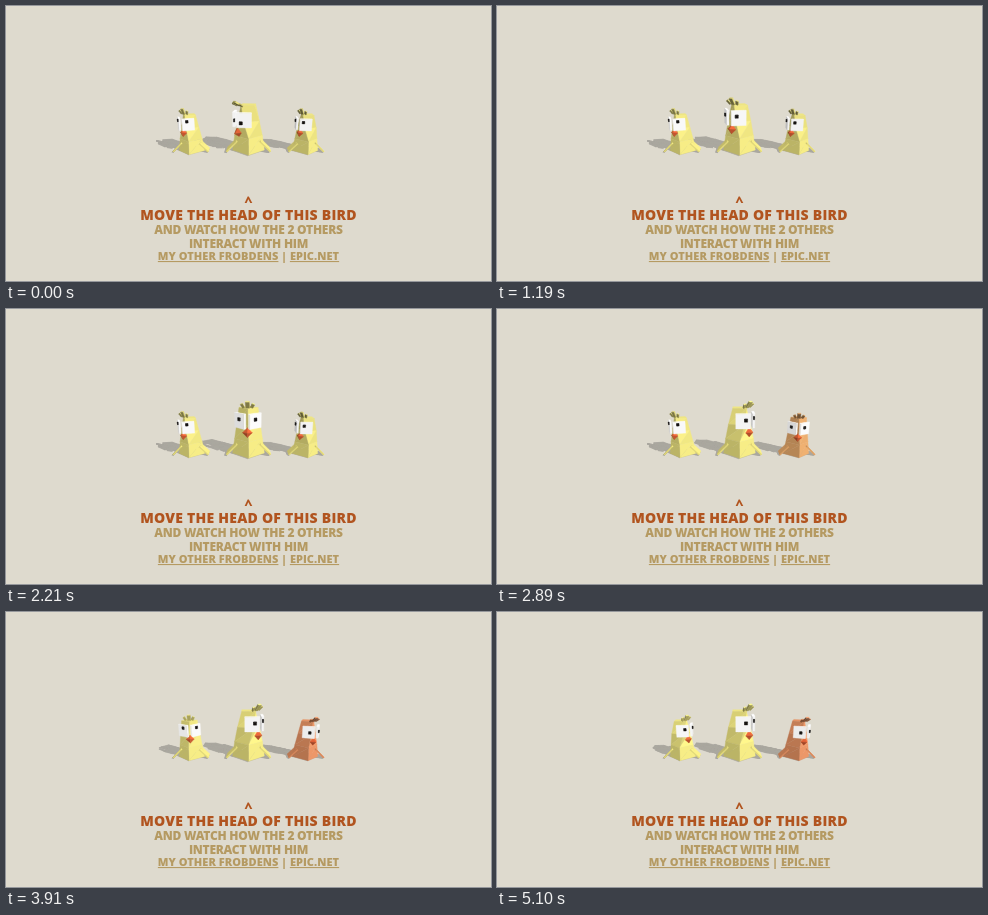
An HTML page for the animation above (5270 ms loop, 485 px wide and 275 px high).

```html
<!DOCTYPE html>
<html lang="en">
<head>
<meta charset="utf-8">
<title>Three birds</title>
<style>
  html, body { margin: 0; width: 100%; height: 100%; overflow: hidden; background: #dedace; }
  svg { display: block; width: 485px; height: 275px; }
  text { font-family: "Open Sans", sans-serif; font-weight: 800; text-anchor: middle; fill: #b59a62; }
  .title { font-size: 14px; letter-spacing: .24px; fill: #b1541f; }
  .sub { font-size: 12px; letter-spacing: -.25px; }
  .links { font-size: 11px; letter-spacing: .05px; }
  .links tspan { text-decoration: underline; }
</style>
</head>
<body>
<svg viewBox="0 0 485 275">
  <rect width="485" height="275" fill="#dedace"/>
  <g id="shadows" fill="#aaa89f" stroke="#aaa89f" stroke-width=".3"></g>
  <g id="birds" stroke-width=".35" stroke-linejoin="round"></g>
  <text class="title" x="242.5" y="200">^</text>
  <text class="title" x="242.5" y="214">MOVE THE HEAD OF THIS BIRD</text>
  <text class="sub" x="242.5" y="228">AND WATCH HOW THE 2 OTHERS</text>
  <text class="sub" x="242.5" y="242">INTERACT WITH HIM</text>
  <text class="links" x="242.5" y="254"><tspan>MY OTHER FROBDENS</tspan> | <tspan>EPIC.NET</tspan></text>
</svg>
<script>
const STEP = 170, STEPS = 31;
const FLOOR = -33;
const CAMERA = [0, 300, 1000];
const DISTANCE = Math.hypot(...CAMERA);
const FOCAL = 137.5 / Math.tan(Math.PI / 6);
const TILT_SIN = 300 / DISTANCE, TILT_COS = 1000 / DISTANCE;
const LIGHT = [1, 1, 1].map(v => v / Math.sqrt(3));
const SKIN = [248, 238, 135], SHY_SKIN = [238, 152, 104];
const WHITE = [255, 255, 255], BLACK = [22, 20, 18], ORANGE = [238, 104, 58];

const { sin, cos, PI } = Math;
const add = (a, b) => a.map((v, i) => v + b[i]);
const sub = (a, b) => a.map((v, i) => v - b[i]);
const dot = (a, b) => a[0] * b[0] + a[1] * b[1] + a[2] * b[2];
const cross = (a, b) => [
  a[1] * b[2] - a[2] * b[1], a[2] * b[0] - a[0] * b[2], a[0] * b[1] - a[1] * b[0]];
const mean = pts => pts.reduce(add).map(v => v / pts.length);
const mix = (a, b, k) => a + (b - a) * k;

const rotX = ([x, y, z], a) => [x, y * cos(a) - z * sin(a), y * sin(a) + z * cos(a)];
const rotY = ([x, y, z], a) => [x * cos(a) + z * sin(a), y, z * cos(a) - x * sin(a)];
const rotZ = ([x, y, z], a) => [x * cos(a) - y * sin(a), x * sin(a) + y * cos(a), z];

// Each key: step, head yaw, head pitch, blush
const BIRDS = [
  { x: -250, y: -8, scale: .8, keys: [
    [0, -.45, -.8, 0], [19, -.45, -.8, 0], [22, .2, -.7, 0], [25, .2, -.7, 0],
    [28, .9, -.4, 0], [30, .9, -.4, 0]] },
  { x: 250, y: -8, scale: .8, keys: [
    [0, -.88, -.6, 0], [15, -.82, -.5, 0], [17, -.2, -.25, .7],
    [20, .35, 0, .95], [23, .45, .1, 1], [30, .45, .1, 1]] },
  { x: 0, y: 0, scale: 1, keys: [
    [0, -.87, .6, 0], [3, -.4, .45, 0], [7, -.6, -.35, 0], [13, -.08, -.3, 0],
    [17, .8, -.2, 0], [30, .8, -.22, 0]] },
];

function poseAt(keys, step) {
  const next = Math.max(1, keys.findIndex(k => k[0] >= step));
  const a = keys[next - 1], b = keys[next];
  const k = (step - a[0]) / (b[0] - a[0]);
  return a.slice(1).map((v, i) => mix(v, b[i + 1], k));
}

function box([w, h, d], pos, [rx, ry, rz], color, ambient) {
  const corner = (i, j, k) =>
    add(pos, rotX(rotY(rotZ([i * w / 2, j * h / 2, k * d / 2], rz), ry), rx));
  const ring = [[-1, -1], [1, -1], [1, 1], [-1, 1]];
  const faces = [-1, 1].flatMap(s => [
    ring.map(([a, b]) => corner(s, a, b)),
    ring.map(([a, b]) => corner(a, s, b)),
    ring.map(([a, b]) => corner(a, b, s))]);
  return { faces, color, ambient };
}

function beak(pos, pitch) {
  const at = p => add(pos, rotX(p, pitch));
  const base = [[20, 0, -10], [0, 20, -10], [-20, 0, -10], [0, -20, -10]].map(at);
  const tip = at([0, 0, 10]);
  return { faces: base.map((p, i) => [p, base[(i + 1) % 4], tip]), color: ORANGE, ambient: .72 };
}

// Four-sided tapered column whose upper rings twist with the head
function body(yaw, color) {
  const rings = [yaw, yaw / 2, 0, 0].map((twist, line) =>
    [0, 1, 2, 3].map(i => rotY([0, 170 - line * 200 / 3, 40 + line * 10], i * PI / 2 + twist)));
  const faces = [rings[0]];
  for (let line = 0; line < 3; line++) {
    for (let i = 0; i < 4; i++) {
      const j = (i + 1) % 4, top = rings[line], low = rings[line + 1];
      faces.push([top[i], low[i], top[j]], [low[i], low[j], top[j]]);
    }
  }
  return { faces, color, ambient: .73 };
}

function wing(side, z, depth, color) {
  return box([60, 5, depth], [side * 72, -6, z], [0, 0, -side * PI / 4], color, .74);
}

function depthOf(part) {
  const c = mean(part.faces.flat());
  return c[1] * TILT_SIN + c[2] * TILT_COS;
}

// Groups of parts, back to front; an iris always lies on its eye
function headParts(yaw, pitch, color) {
  const groups = [[beak([0, 70 - pitch * 20, 65], pitch / 3)]];
  for (const side of [-1, 1]) {
    const turn = [0, side * PI / 4, 0];
    const iris = [side * 33.5 + yaw * 10, 120 - pitch * 30, 53.5 - side * yaw * 10];
    groups.push([
      box([60, 60, 10], [side * 30, 120 - pitch * 10, 50], turn, WHITE, .88),
      box([12, 12, 4], iris, turn, BLACK, .9)]);
  }
  for (const side of [-1, 1, 0]) {
    const pos = [side * 20, (side ? 180 : 185) - pitch * 10, (side ? 50 : 55) + pitch * 10];
    const size = side ? [10, 20, 5] : [15, 30, 7.5];
    groups.push([box(size, pos, [PI / 4 + pitch / 2, 0, -side * PI / 8], color, .5)]);
  }
  const turned = p => ({ ...p, faces: p.faces.map(f => f.map(v => rotY(v, yaw))) });
  return groups.map(g => g.map(turned)).sort((a, b) => depthOf(a[0]) - depthOf(b[0])).flat();
}

function buildBird(bird, step) {
  const [yaw, pitch, blush] = poseAt(bird.keys, step);
  const skin = SKIN.map((v, i) => mix(v, SHY_SKIN[i], blush));
  const parts = [
    wing(-1, 0, 60, skin), wing(1, 0, 60, skin), body(yaw, skin),
    wing(-1, 18, 24, skin), wing(1, 18, 24, skin), ...headParts(yaw, pitch, skin)];
  const place = ([x, y, z]) => [x * bird.scale + bird.x, y * bird.scale + bird.y, z * bird.scale];
  return parts.map(p => ({ ...p, faces: p.faces.map(f => f.map(place)) }));
}

function project([x, y, z]) {
  const s = FOCAL / (DISTANCE - y * TILT_SIN - z * TILT_COS);
  const px = 242.5 + x * s, py = 137.5 - (y * TILT_COS - z * TILT_SIN) * s;
  return px.toFixed(2) + "," + py.toFixed(2);
}

const polygon = (pts, attrs = "") => `<polygon points="${pts.map(project).join(" ")}"${attrs}/>`;

function drawPart({ faces, color, ambient }) {
  const center = mean(faces.flat());
  return faces.map(face => {
    const mid = mean(face);
    let normal = cross(sub(face[1], face[0]), sub(face[2], face[0]));
    const size = Math.hypot(...normal) * (dot(normal, sub(mid, center)) < 0 ? -1 : 1);
    normal = normal.map(v => v / size);
    if (dot(normal, sub(CAMERA, mid)) <= 0) return "";
    const lit = dot(normal, LIGHT);
    const shade = ambient + (lit > 0 ? (1 - ambient) * 1.1 : .25) * lit + .06 * normal[1];
    const rgb = color.map(v => Math.round(Math.min(255, v * shade)));
    return polygon(face, ` fill="rgb(${rgb})" stroke="rgb(${rgb})"`);
  }).join("");
}

const castOnFloor = ([x, y, z]) => {
  const height = Math.max(0, y - FLOOR);
  return [x - height, FLOOR, z - height];
};

const shadowLayer = document.getElementById("shadows");
const birdLayer = document.getElementById("birds");

function render(step) {
  const parts = BIRDS.flatMap(bird => buildBird(bird, step));
  shadowLayer.innerHTML =
    parts.flatMap(p => p.faces.map(f => polygon(f.map(castOnFloor)))).join("");
  birdLayer.innerHTML = parts.map(drawPart).join("");
}

const start = performance.now();
let shown = -1;
function tick() {
  const step = Math.floor((performance.now() - start) / STEP) % STEPS;
  if (step !== shown) render(shown = step);
  requestAnimationFrame(tick);
}
tick();
</script>
</body>
</html>
```
